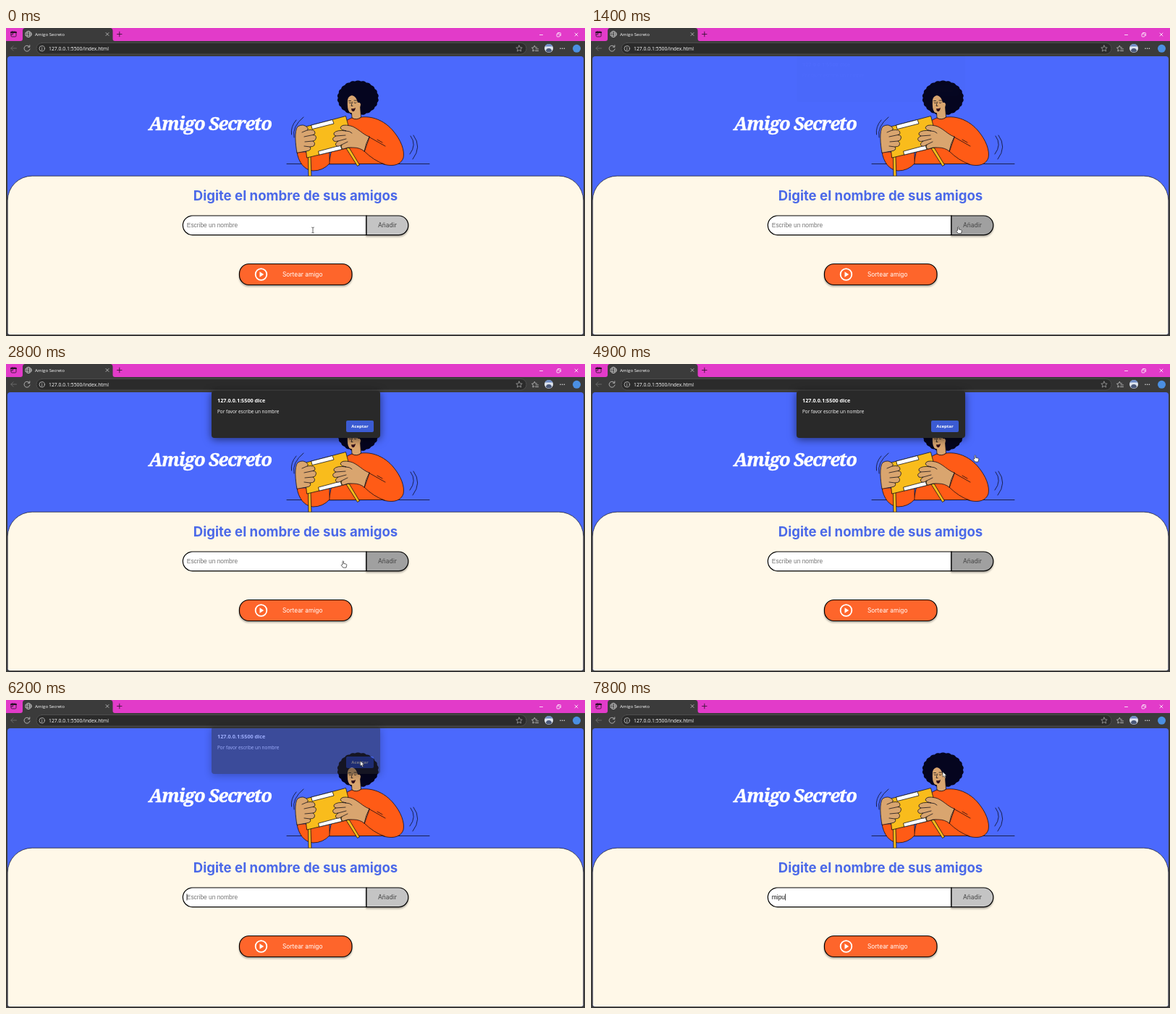
Recreate the animation shown at these times as an HTML page. Size 800 by 425 pixels, loop 8 s.

```html
<!DOCTYPE html>
<html lang="es">
<head>
<meta charset="utf-8">
<title>Amigo Secreto</title>
<style>
html, body { margin: 0; width: 100%; height: 100%; overflow: hidden; background: #3b3b3b; }
svg { display: block; width: 100%; height: 100%; }
.ui { font-family: "Open Sans", "Noto Sans", sans-serif; fill: #fff; }
.page { font-family: Inter, Roboto, sans-serif; font-optical-sizing: none; }
.title { font: italic 700 25.4px "Noto Serif", "Liberation Serif", serif; letter-spacing: -1.2px; fill: #fff; stroke: #fff; stroke-width: .45; }
.field { font-family: "Liberation Sans", Arial, sans-serif; font-size: 8.4px; }
.icon { fill: none; stroke: #c8c8c8; stroke-width: .8; stroke-linecap: round; stroke-linejoin: round; }
.ink { stroke: #0a0a14; stroke-width: .75; stroke-linejoin: round; stroke-linecap: round; }
.line { fill: none; }
.skin { fill: #d9a56f; }
.orange { fill: #ff5b16; }
.gold { fill: #f9bc1c; }
.edge { stroke: #000; stroke-width: 1.2; }
.raised { filter: drop-shadow(0 2px 1.2px rgba(0,0,0,.3)); }
#dialog { filter: drop-shadow(0 2px 6px rgba(0,0,0,.55)); }
</style>
</head>
<body>
<svg viewBox="0 0 800 425" xmlns="http://www.w3.org/2000/svg">
  <defs>
    <clipPath id="view"><rect x="2" y="39" width="796" height="384" rx="4"/></clipPath>
  </defs>

  <!-- Browser frame -->
  <rect width="800" height="425" fill="#3b3b3b"/>
  <rect width="800" height="18" fill="#e23bc9"/>
  <path d="M20 18Q23 18 23 15V4Q23 0 27 0H143.500Q147.500 0 147.500 4V15Q147.500 18 150.500 18Z" fill="#3b3b3b"/>
  <g class="icon">
    <g stroke="#2a1027"><rect x="7" y="5" width="7" height="7" rx="1.3"/><path d="M7 6H14" stroke-width="2"/><path d="M9.500 6V9H7"/></g>
    <circle cx="31" cy="8.500" r="4.200"/><ellipse cx="31" cy="8.500" rx="1.900" ry="4.200"/><path d="M27 7H35M27 10H35"/>
    <path d="M138 6.500L142 10.500M142 6.500L138 10.500"/>
    <path d="M153.500 8.500H160M156.800 5.200V11.800" stroke="#2a1027"/>
    <g stroke="#fff">
      <path d="M737.500 9.500H741.500M786 7L790 11M790 7L786 11"/>
      <rect x="761" y="8" width="4" height="4" rx=".8"/><path d="M762.500 6.500H765.500Q766.500 6.500 766.500 7.500V10.500"/>
    </g>
    <path d="M14.500 28H7M10 24.800L6.800 28L10 31.200" stroke="#747474"/>
    <path d="M32.300 25.800A4 4 0 1 0 33 29M32.800 23.800V26.300H30.300"/>
    <rect x="42" y="20.500" width="677" height="15.500" rx="7.700" fill="#2b2b2b" stroke="#585858" stroke-width=".7"/>
    <circle cx="49.700" cy="28.300" r="3.700"/><path d="M49.700 28V30.300M49.700 26.400V26.500"/>
    <path stroke="#a0a0a0" d="M709 24L710.300 26.800L713.200 27.100L711 29.100L711.700 32.100L709 30.500L706.300 32.100L707 29.100L704.800 27.100L707.700 26.800Z"/>
    <path d="M730 31L727.800 32L728.300 29.100L726.500 27.200L729 26.800L730.300 24.300L731.500 26.800L733.500 27M732 29H735.500M731.500 31.500H735.500"/>
  </g>
  <circle cx="750" cy="28" r="6" fill="#dfe5ef"/>
  <path d="M744.500 25.500A6 6 0 0 1 755.500 25.500Z" fill="#6f8cc6"/>
  <path d="M746 32Q746 28 750 28T754 32Q750 35 746 32Z" fill="#4b5878"/>
  <g fill="#dcdcdc"><circle cx="766" cy="28.300" r=".8"/><circle cx="768.700" cy="28.300" r=".8"/><circle cx="771.400" cy="28.300" r=".8"/></g>
  <circle cx="788.500" cy="28.300" r="5.500" fill="#4b8fe2"/>
  <text class="ui" x="40" y="10.700" font-size="6.100">Amigo Secreto</text>
  <text class="ui" x="59" y="30.700" font-size="6.850">127.0.0.1:5500/index.html</text>

  <!-- Web page -->
  <g clip-path="url(#view)">
    <rect y="39" width="800" height="386" fill="#4b69fd"/>
    <text class="title" x="282" y="140.500" text-anchor="middle">Amigo Secreto</text>

    <g class="ink">
      <path class="line" d="M388 187.500H585"/>
      <path class="line" d="M398 151Q395 136 411 123M394.500 147Q393 136 401 127M559 149Q568 161 558 174M563 148Q575 164 562 181"/>
      <path id="hair" fill="#05051f" stroke="none"/>
      <path class="skin" d="M477 109L478 124Q484 129 490.500 123L489.500 108Z"/>
      <path class="skin" stroke="none" d="M472 99Q471 112 474.500 116Q480 120 486 112Q490 110 490 105Q489 102 486 103Q484 94 478 93Q473 94 472 99Z"/>
      <path class="line" d="M474 103Q475.500 104.500 477 103M481 103Q482.500 104.500 484 103M478.500 102L477 107.500H479M473.500 100.500H476.500M481 100H484.500"/>
      <path d="M477 111Q480 112 483 110Q482 116 479 115Q477 114 477 111Z" fill="#32101a" stroke="none"/>
      <path class="orange" d="M446 187.500C449 172 453 149 462 136Q467 128 478 124Q484 128 491 123C509 121 525 130 535 142C546 155 551 169 549 179C545 191 531 191 520 187.500Z"/>
      <path class="line" d="M501 150L524 163M513 154L520 158M495 170Q508 183 523 188"/>
      <path class="orange" d="M402 171C404 185 412 196 424 197Q438 197 447 187L447 172Z"/>
      <path class="gold" d="M417.500 176L418 206H422L421 176ZM470 166L485.500 190.500L488.500 189L474 165Z"/>
      <path class="gold" d="M411 137L469.500 121.500L480.500 163.500L416 179Z"/>
      <path d="M422 134L451 126.500L453 132L423.500 139.500ZM432 170L462 162L464 167.500L433 175Z" fill="#fff"/>
      <path class="skin" d="M402 172C400 161 398 142 403 136Q411 131 417 138Q418 140 416 141Q427 139 427 145Q427 147 424 147.500Q430 148 428 153Q427 156 424 156Q428 158 426 162Q424 164 420 164Q423 169 415 170Z"/>
      <path class="line" d="M416 141L409 144M424 147.500L412 150M424 156L413 157M420 164L412 163"/>
      <path class="skin" d="M502 150C494 148 485 137 476 135Q463 132 462 138Q463 141 470 142Q457 140 453 145Q452 148 456 149Q449 152 453 156Q455 157 459 156Q453 160 457 163Q460 164 464 161Q462 166 466 167Q472 164 480 165Q489 165 495 170Z"/>
      <path class="line" d="M470 142Q475 142 478 145M456 149L469 148M459 156L470 153M464 161L472 157"/>
      <path class="line" d="M502 150Q497 159 495 170"/>
    </g>

    <path d="M2.200 430V238A34 34 0 0 1 36.200 204.200H763.800A34 34 0 0 1 797.800 238V430Z" fill="#fff8e8" stroke="#16161c" stroke-width=".7"/>
    <text class="page" x="400" y="238.300" text-anchor="middle" font-size="18.600" font-weight="700" fill="#4b69e8">Digite el nombre de sus amigos</text>

    <path class="edge" d="M498 259H257.700A13.300 13.300 0 0 0 257.700 285.600H498Z" fill="#fff"/>
    <path id="add" class="edge raised" d="M498 259H542.500A13.300 13.300 0 0 1 542.500 285.600H498Z"/>
    <text class="page" x="527" y="275.200" text-anchor="middle" font-size="8.450" fill="#444">Añadir</text>
    <text id="entry" class="field" x="249.800" y="275"></text>
    <path id="caret" d="M0 267.500V276.500" stroke="#111" stroke-width=".8"/>

    <rect class="edge raised" x="322.500" y="325.500" width="155.500" height="29" rx="13.300" fill="#fe652b"/>
    <circle cx="352.500" cy="340" r="7.800" fill="none" stroke="#fff" stroke-width="1.800"/>
    <path d="M350.500 336.300V343.700L356.200 340Z" fill="#fff"/>
    <text class="page" x="409.700" y="343" text-anchor="middle" font-size="8.350" fill="#fff">Sortear amigo</text>
  </g>

  <g id="dialog" class="ui">
    <rect x="284" y="37" width="233" height="65" rx="4" fill="#292929"/>
    <text x="292" y="52.700" font-size="7.250" font-weight="700">127.0.0.1:5500 dice</text>
    <text x="292" y="67.700" font-size="6.400">Por favor escribe un nombre</text>
    <rect id="accept" x="470" y="78" width="38" height="16" rx="2"/>
    <text x="489" y="88.200" text-anchor="middle" font-size="5.950" font-weight="700">Aceptar</text>
  </g>

  <g id="cursor">
    <path id="beam" d="M-1.800 -4Q0 -4 0 -3Q0 -4 1.800 -4M0 -3V3M-1.800 4Q0 4 0 3Q0 4 1.800 4" fill="none" stroke="#555" stroke-width=".9"/>
    <path id="hand" d="M-1.500 1V-3.500Q-.7 -5 .1 -3.500V-.7L3.500 .1Q4.500 .5 4.300 1.500L3.500 5H-.7L-3.300 1.700Q-2.800 .4 -1.500 1Z" fill="#fff" stroke="#222" stroke-width=".7"/>
    <path id="arrow" d="M0 0V7.200L1.700 5.700L2.900 8.300L4.100 7.700L3 5.200H5.200Z" fill="#fff" stroke="#222" stroke-width=".6"/>
  </g>
</svg>
<script>
const LOOP = 8000;
const el = Object.fromEntries([...document.querySelectorAll('[id]')].map(e => [e.id, e]));

// Pointer stops: time, x, y
const route = [
  [400, 424, 279], [1200, 508, 278.5],
  [2300, 508, 278.5], [2800, 466.5, 276],
  [3000, 466.5, 276], [3100, 466.5, 275.5],
  [3500, 466.5, 275.5], [3700, 556, 265],
  [4899, 556, 265], [4900, 531.5, 130],
  [5400, 489.5, 84], [6600, 489.5, 84], [6800, 486, 99]
];
const typed = [[7200, 'm'], [7600, 'mi'], [7800, 'mipu']];

const clamp = v => Math.min(1, Math.max(0, v));
const ease = v => v * v * (3 - 2 * v);
const ramp = (t, a, b) => ease(clamp((t - a) / (b - a)));
const within = (t, a, b) => t >= a && t < b;
const show = (node, on) => node.setAttribute('visibility', on ? 'visible' : 'hidden');

function pointer(t) {
  const i = route.findIndex(p => p[0] > t);
  if (i === 0) return route[0].slice(1);
  if (i < 0) return route[route.length - 1].slice(1);
  const [a, x, y] = route[i - 1], [b, u, v] = route[i];
  const k = ramp(t, a, b);
  return [x + (u - x) * k, y + (v - y) * k];
}

function drawHair() {
  let d = '';
  for (let i = 0; i < 180; i++) {
    const a = i * Math.PI / 90;
    const r = .965 + .04 * Math.abs(Math.sin(a * 11));
    d += `${i ? 'L' : 'M'}${(486.3 + 28.5 * r * Math.cos(a)).toFixed(1)} ${(96.5 + 24 * r * Math.sin(a)).toFixed(1)}`;
  }
  el.hair.setAttribute('d', d + 'Z');
}

function render(t) {
  const [x, y] = pointer(t);
  const overAdd = x > 498 && t < 1300;
  const modal = within(t, 1300, 6150);

  el.cursor.setAttribute('transform', `translate(${x.toFixed(2)} ${y.toFixed(2)})`);
  show(el.beam, t < 1300 && !overAdd);
  show(el.hand, overAdd || within(t, 1300, 5200));
  show(el.arrow, t >= 5200);

  el.add.setAttribute('fill', overAdd || modal ? '#a0a0a0' : '#c4c4c4');
  el.accept.setAttribute('fill', within(t, 5300, 6150) ? '#4865d2' : '#3b5bd2');
  const opacity = ramp(t, 1390, 1580) * (1 - ramp(t, 6080, 6310));
  el.dialog.setAttribute('opacity', opacity);
  show(el.dialog, opacity > 0);

  const text = typed.filter(s => s[0] <= t).map(s => s[1]).pop() || '';
  el.entry.textContent = text || 'Escribe un nombre';
  el.entry.setAttribute('fill', text ? '#111' : '#757575');
  const end = text ? el.entry.getComputedTextLength() + .4 : 0;
  el.caret.setAttribute('transform', `translate(${250 + end} 0)`);
  show(el.caret, text || within(t, 100, 600) || within(t, 1100, 1300) || within(t, 6200, 6700));
}

function tick(now) {
  render(now % LOOP);
  requestAnimationFrame(tick);
}

drawHair();
render(0);
requestAnimationFrame(tick);
</script>
</body>
</html>
```
